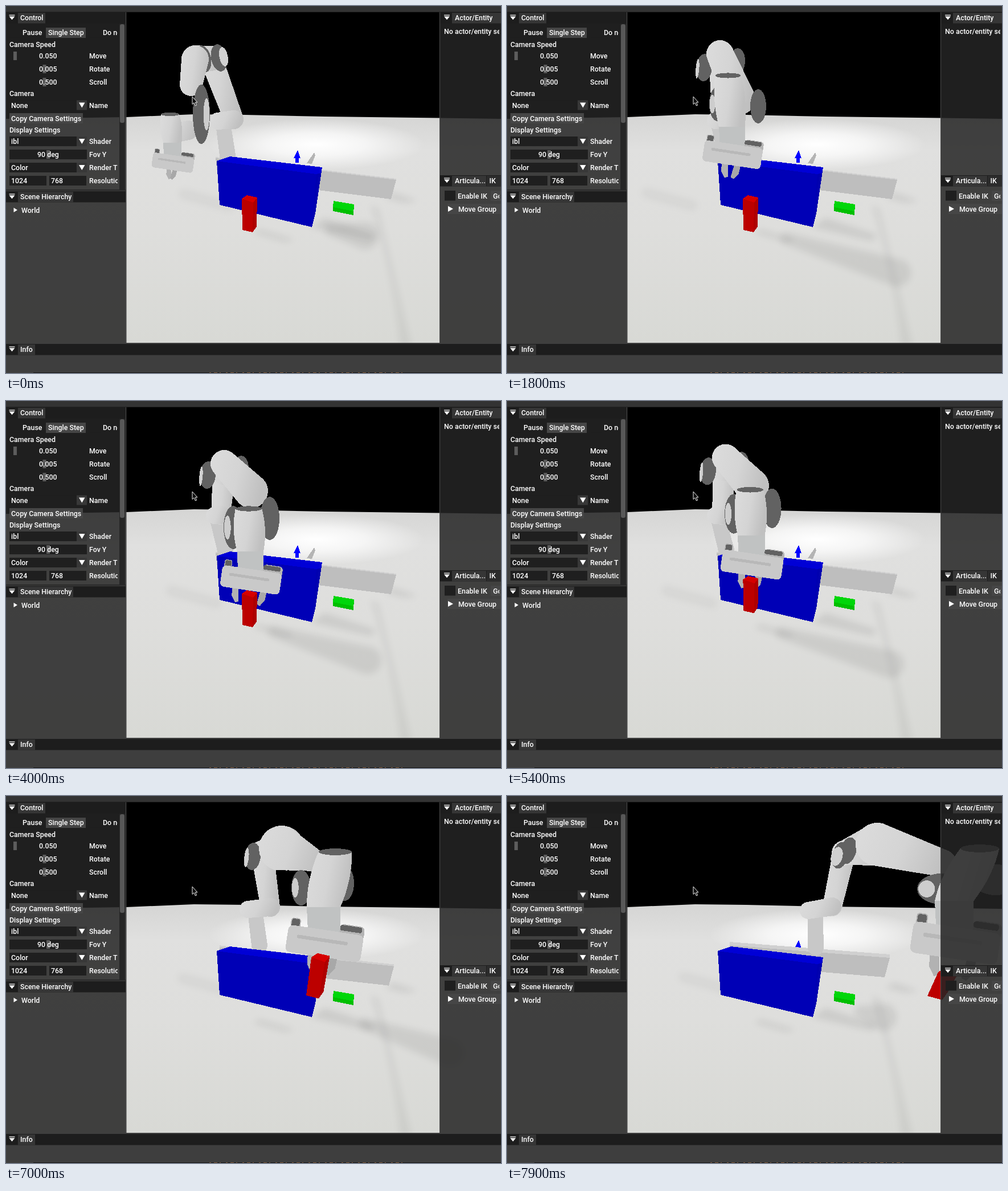
These frames come from a looping animation (869x644 px, 8 s). An HTML page:

```html
<!DOCTYPE html>
<html lang="en">
<head>
<meta charset="utf-8">
<title>Robot arm simulation</title>
<style>
html, body { margin: 0; width: 100%; height: 100%; overflow: hidden; background: #000; }
svg { display: block; }
text { font: 500 12.4px Roboto, sans-serif; fill: #fff; white-space: pre; }
</style>
</head>
<body>
<svg id="stage" width="869" height="644" viewBox="0 0 869 644">
  <defs>
    <linearGradient id="floor" x2="0" y2="1">
      <stop offset="0" stop-color="#d5d5d4"/><stop offset=".16" stop-color="#e0e0df"/>
      <stop offset=".5" stop-color="#dededc"/><stop offset="1" stop-color="#d8d9d5"/>
    </linearGradient>
    <radialGradient id="glow">
      <stop offset="0" stop-color="#fff"/><stop offset=".45" stop-color="#fff" stop-opacity=".7"/>
      <stop offset="1" stop-color="#fff" stop-opacity="0"/>
    </radialGradient>
    <linearGradient id="arm" x2="1" y2=".25">
      <stop offset="0" stop-color="#dcdcdc"/><stop offset=".55" stop-color="#d4d4d4"/>
      <stop offset="1" stop-color="#c0c0c0"/>
    </linearGradient>
    <filter id="soft" x="-30%" y="-30%" width="160%" height="160%"><feGaussianBlur stdDeviation="6"/></filter>
    <clipPath id="leftClip"><path d="M0 0H196V644H0z"/></clipPath>
    <clipPath id="rightClip"><path d="M762 0H866V644H762z"/></clipPath>
  </defs>

  <path d="M0 0H869V644H0z"/>
  <path d="M0 198L211 195 330 190 420 191 560 194 762 196.5 869 198V592H0z" fill="url(#floor)"/>
  <ellipse cx="545" cy="243" rx="190" ry="45" fill="url(#glow)"/>
  <g filter="url(#soft)">
    <path d="M640 350L654 355 712 598H692Q680 470 640 350z" opacity=".05"/>
    <path d="M535 388L560 372 650 402 640 412z" opacity=".08"/>
    <path d="M434 398L446 392 506 410 490 414z" opacity=".07"/>
    <path d="M665 336L680 328 722 342 700 345z" opacity=".08"/>
  </g>
  <g id="shadows" filter="url(#soft)"></g>
  <g shape-rendering="crispEdges">
    <path id="stub" d="M528 276L541 257 543 262 537 277z" fill="#b4b4b4"/>
    <path d="M512 253L517 267H514V275H508V267H505z" fill="#00f"/>
    <g id="back"></g>
    <path d="M370 272L546 294 537 388 375 349z" fill="#0000b6"/>
    <path d="M545 294L555 283 543 364 537 388z" fill="#0000b0"/>
    <path d="M370 272L393 264 555 283 553 293 545 295z" fill="#0000d6"/>
    <path d="M575 342L611 348 610 367 574 360z" fill="#00bf00"/>
    <path d="M575 342L611 348 610 360 574 353z" fill="#00d60a"/>
    <g id="robot"></g>
    <g id="hand"></g>
    <g id="block"></g>
  </g>
  <g id="ui"></g>
</svg>
<script>
const $ = id => document.getElementById(id);

function add(parent, tag, attrs, text) {
  const el = document.createElementNS('http://www.w3.org/2000/svg', tag);
  for (const k in attrs) el.setAttribute(k, attrs[k]);
  if (text) el.textContent = text;
  return parent.appendChild(el);
}

// Interpolates numbers, and arrays or objects of numbers.
function mix(a, b, u) {
  if (typeof a === 'number') return a + (b - a) * u;
  if (Array.isArray(a)) return a.map((v, i) => mix(v, b[i], u));
  return Object.fromEntries(Object.keys(a).map(k => [k, mix(a[k], b[k], u)]));
}
const plus = ([x, y], [dx, dy], k = 1) => [x + dx * k, y + dy * k];
const poly = (...pts) => 'M' + pts.join(' ') + 'Z';

// Limb with round ends.
function limb(a, r, b, q) {
  const len = Math.hypot(b[0] - a[0], b[1] - a[1]) || 1;
  const n = [(a[1] - b[1]) / len, (b[0] - a[0]) / len];
  return `M${plus(a, n, r)}A${r} ${r} 0 0 1 ${plus(a, n, -r)}L${plus(b, n, -q)}A${q} ${q} 0 0 1 ${plus(b, n, q)}Z`;
}
function ellipse([x, y], rx, ry, deg = 0) {
  const c = rx * Math.cos(deg * Math.PI / 180), s = rx * Math.sin(deg * Math.PI / 180);
  const arc = `A${rx} ${ry} ${deg} 0 1`;
  return `M${x - c} ${y - s}${arc} ${x + c} ${y + s}${arc} ${x - c} ${y - s}Z`;
}

// Joints of the arm; elbow and fore carry a radius, size is the half width of
// the wrist column, face tells how far the left (+) or right (-) side shows.
const home = {
  lobe: [372, 202], shoulder: [400, 199], foot: [389, 262],
  knee: [360, 92], axle: [14, -1], elbow: [332, 93, 24], fore: [325, 138, 20], face: -7.5,
  wrist: [320, 218], side: [23, -28], pad: [15, 52],
  top: [288, 190], hand: [293, 275], size: 17, open: .2, yaw: 0,
  block: [414, 338], edge: [1, 1, 55],
  shade: [570, 393, 630, 403], dim: [352, 340]
};
const swing = { ...home,
  lobe: [366, 201], shoulder: [377, 200], foot: [385, 262],
  knee: [375, 103], axle: [29, -5], elbow: [374, 84, 24], fore: [408, 163, 28], face: 3,
  wrist: [405, 174], side: [36, 2], pad: [14, 30],
  top: [388, 122], hand: [396, 261], size: 24, open: .35,
  shade: [490, 408, 685, 468], dim: [285, 338]
};
const above = { ...swing,
  knee: [380, 108], elbow: [385, 84, 24], fore: [430, 135, 30],
  wrist: [433, 162], side: [36, 0], pad: [15, 30],
  top: [428, 106], hand: [430, 247], size: 26, open: .4,
  shade: [500, 410, 730, 472], dim: [305, 343]
};
const reach = { ...above,
  knee: [383, 125], elbow: [383, 110, 24], fore: [430, 158, 30],
  wrist: [431, 214], side: [32, -8], pad: [17, 38],
  top: [426, 189], hand: [430, 314], size: 24.5, open: .9,
  shade: [470, 405, 635, 455], dim: [330, 343]
};
const grip = { ...reach, open: .5 };
const lifted = { ...above, open: .5, block: [415, 276] };
const turn = {
  lobe: [425, 199], shoulder: [464, 195], foot: [445, 262],
  knee: [450, 100], axle: [17, -6], elbow: [484, 92, 40], fore: [548, 115, 18], face: 4,
  wrist: [556, 157], side: [38, -4], pad: [17, 31],
  top: [578, 98], hand: [559, 259], size: 31, open: .5, yaw: .3,
  block: [536, 283], edge: [1.2, -9, 67],
  shade: [630, 400, 780, 450], dim: [350, 330]
};
const away = {
  lobe: [529, 201], shoulder: [571, 194], foot: [542, 266],
  knee: [592, 100], axle: [7, -4], elbow: [650, 85, 38], fore: [765, 118, 24], face: 10,
  wrist: [810, 155], side: [48, -8], pad: [42, 27],
  top: [830, 92], hand: [787, 258], size: 36, open: .8, yaw: 1,
  block: [757, 309], edge: [1.4, -19, 42],
  shade: [620, 378, 660, 388], dim: [350, 328]
};

const easeIn = u => u * u, easeOut = u => u * (2 - u), smooth = u => u * u * (3 - 2 * u);
const steps = [
  [0, home], [700, home], [1800, swing, easeIn], [2350, above, easeOut], [3100, above],
  [4000, reach, smooth], [4250, reach], [4600, grip, smooth], [4750, grip], [6250, lifted, smooth],
  [7000, turn, easeIn], [7900, away, u => u * (1.3 - .3 * u)], [8000, away]
];

const parts = [];
const part = (group, fill, shape, extra) =>
  parts.push([add($(group), 'path', { fill, ...extra }), shape]);
const light = 'url(#arm)', dark = '#626262';

part('shadows', '#000', p => limb(p.shade.slice(0, 2), 10, p.shade.slice(2), 24), { opacity: .075 });
part('shadows', '#000', p => limb(plus(p.dim, [-40, -10]), 9, plus(p.dim, [40, 12]), 9), { opacity: .035 });

// long bar, turning a little as the robot leaves
const bar = ({ yaw }) => ({
  l: mix([368, 267], [391, 262], yaw), r: mix([685, 305], [672, 284], yaw), lip: mix(2, 6, yaw)
});
part('back', '#bebebe', p => {
  const { l, r } = bar(p);
  return poly(l, r, plus(r, [-9, 34]), plus(l, [4, 34]));
});
part('back', '#d0d0d0', p => {
  const { l, r, lip } = bar(p);
  return poly(plus(l, [0, -lip]), plus(r, [0, -lip]), r, l);
});

part('back', '#c8c8c8', p => limb(p.foot, 14, mix(p.lobe, p.shoulder, .3), 13));
part('back', light, p => limb(p.shoulder, 17, p.knee, 20));
part('back', light, p => limb(p.lobe, 15, p.shoulder, 16));

// elbow with a dark cap on either end of its axle
const xy = ([x, y]) => [x, y];
const cap = (p, k) => ellipse(plus(p.knee, p.axle, k), 14, 24, p.face * 1.5);
part('robot', light, p => limb(p.knee, 22, xy(p.elbow), p.elbow[2]));
part('robot', dark, p => cap(p, 1));
part('robot', dark, p => cap(p, -1));
part('robot', '#d0d0d0', p => {
  const s = Math.sign(p.face) || 1, r = Math.abs(p.face);
  return ellipse(plus(plus(p.knee, p.axle, -s), [-s * (14 - r * .8), s * 2]), r, 17, p.face * 1.5);
});
part('robot', light, p => limb(xy(p.elbow), p.elbow[2], xy(p.fore), p.fore[2]));

// wrist: dark pads beside the column; the left one is hidden when facing right
part('robot', light, p => limb(mix(p.top, p.hand, .4), 17, p.wrist, 17));
part('robot', dark, p => ellipse(plus(p.wrist, p.side), ...p.pad));
part('robot', dark, p => {
  const k = Math.min(1, Math.max(0, p.face / 3));
  return ellipse(plus(p.wrist, p.side, -1), p.pad[0] * k, p.pad[1] * k);
});
part('robot', '#cdcdcd', p => {
  const s = Math.sign(p.face) || 1, [rx, ry] = p.pad;
  return ellipse(plus(plus(p.wrist, p.side, -s), [-s * rx * .6, 0]), rx * .35, ry * .55);
});

const neck = p => plus(p.hand, [-.05, -2.05], p.size);
const wide = (c, s, k) => [plus(c, [-s, 0], k), plus(c, [s, 0], k)];
part('robot', '#c0c2c2', p => {
  const [a, b] = wide(neck(p), p.size, .95), [c, d] = wide(p.hand, p.size, .9);
  return poly(a, b, d, c);
});
part('robot', light, p => {
  const [a, b] = wide(p.top, p.size, .95), [c, d] = wide(neck(p), p.size, .95);
  const [l, r] = wide(mix(p.top, neck(p), .5), p.size, 1.3);
  return `M${a}L${b}Q${r} ${d}L${c}Q${l} ${a}Z`;
});
part('robot', dark, p => ellipse(p.top, p.size * .93, p.size * .19));

// hand, in units of the column's half width
const gripper = $('hand');
const round = (x, y, width, height, rx, fill) => add(gripper, 'rect', { x, y, width, height, rx, fill });
const finger = s => p => {
  const x = s * p.open;
  return poly([x - s * .1, .6], [x + s * .35, .6], [x + s * .3, 1.3], [x, 1.75], [x - s * .25, 1.65], [x - s * .2, 1.3]);
};
round(-2.05, -1.2, .55, .6, .15, '#b0b0b0');
round(-2, -1.15, .45, .45, .12, dark);
round(.75, -1.25, 1.4, .8, .25, '#b4b4b4');
round(.75, -1.2, 1.25, .32, .12, dark);
part('hand', '#b2b2b2', finger(-1));
part('hand', '#a8a8a8', finger(1));
round(-2.15, -.77, 4.3, 1.54, .28, '#c9c9c9');
round(-1.6, -.28, 2.9, .2, .08, '#b8b8b8');

// red block: one top corner, then scale and the vector to its foot
const corners = ({ block: a, edge: [k, dx, dy] }) => {
  const b = plus(a, [9, -6], k), c = plus(a, [27, -2], k), d = plus(a, [20, 7], k);
  const down = pt => plus(pt, [dx, dy]);
  return { a, b, c, d, da: down(a), dc: plus(down(c), [-2, -4]), dd: plus(down(d), [-2, -3]) };
};
const face = names => p => poly(...names.map(n => corners(p)[n]));
part('block', '#ae0000', face(['d', 'c', 'dc', 'dd']));
part('block', '#bc0000', face(['a', 'd', 'dd', 'da']));
part('block', '#d60000', face(['a', 'b', 'c', 'd']));

function draw(t) {
  const i = steps.findIndex(s => s[0] > t);
  const [t0, from] = steps[i - 1], [t1, to, ease = smooth] = steps[i];
  const p = mix(from, to, ease((t - t0) / (t1 - t0)));
  for (const [el, shape] of parts) el.setAttribute('d', shape(p));
  gripper.setAttribute('transform', `translate(${p.hand}) rotate(8.5) scale(${p.size})`);
  $('stub').setAttribute('opacity', p.yaw > .3 ? 0 : 1);
}

// interface
const ui = $('ui');
const box = (x, y, width, height, fill) => add(ui, 'rect', { x, y, width, height, fill });
const path = (d, fill = '#fff') => add(ui, 'path', { d, fill });
const label = (s, x, y, clip) => add(ui, 'text', clip ? { x, y, 'clip-path': `url(#${clip})` } : { x, y }, s);
const field = '#1f1f1f', grab = '#5c5c5c', button = '#464646', panel = 'rgba(37,37,37,.855)';

path('M327 159V172.5L330 169.8 332.4 175 334.6 174 332.3 169H336z', '#111').setAttribute('stroke', '#eee');
box(0, 11, 211.5, 581, panel);
box(761.5, 11, 108, 581, panel);
box(0, 0, 869, 11, '#333');
box(0, 10, 869, 1, '#222');
box(0, 591, 869, 53, '#3e3e3e');
box(210, 11, 1, 580, '#4a4a4a');
box(761, 11, 1, 580, '#4a4a4a');
box(0, 322, 210, 2, '#292929');
box(48, 643, 821, 1, '#141414');
add(ui, 'path', { d: 'M357 643.5H700', stroke: '#a0683c', 'stroke-dasharray': '3 5 6 4 2 9', opacity: .7 });

function title(x, y, w, tab, s) {
  box(x, y, w, 19.5, '#1d1d1d');
  box(x + 21, y + 1, tab, 18.5, '#363636');
  const cx = x + (x ? 12 : 10.5);
  path(`M${cx - 5} ${y + 4.5}h10v1.2h-10zM${cx - 5} ${y + 7.2}h10l-5 6z`);
  label(s, x + (x ? 26 : 25), y + 14);
}
title(0, 11, 210, 48, 'Control');
title(0, 325, 210, 97, 'Scene Hierarchy');
title(0, 593, 869, 30, 'Info');
title(762, 11, 107, 96, 'Actor/Entity');
title(762, 297, 107, 60, 'Articula...');
box(844, 298, 25, 18.5, '#2c2c2c');
label('IK', 848.5, 311);

box(199, 31, 10, 291, '#262626');
add(ui, 'rect', { x: 200, y: 32, width: 8, height: 173, rx: 3, fill: '#585858' });
for (const [x, y] of [[6, 38], [147, 38], [770, 324]]) box(x, y, 19, 17.5, field);
for (const [x, y, w] of [[70, 38, 70], [6, 188, 129], [851, 324, 18], [775, 347, 94]]) box(x, y, w, 18, button);

function slider(y, knob, value, x, name) {
  box(6, y, 136, 17, field);
  box(knob, y + 1, 6, 15, grab);
  label(value, x, y + 13);
  label(name, 146, y + 13);
}
function combo(y, value, name) {
  box(6, y, 118, 17, field);
  box(124, y, 18, 17, '#383838');
  path(`M128 ${y + 4}h10.5l-5.2 9z`);
  label(value, 9, y + 13);
  label(name, 146, y + 13, 'leftClip');
}
slider(79, 13, '0.050', 58, 'Move');
slider(102, 64.5, '0.005', 58, 'Rotate');
slider(125, 64.5, '0.500', 58, 'Scroll');
combo(165.5, 'None', 'Name');
combo(229, 'ibl', 'Shader');
slider(252, 71, '90 deg', 55, 'Fov Y');
combo(275, 'Color', 'Render T');
for (const [x, s] of [[6, '1024'], [76, '768']]) {
  box(x, 298, 65, 17, field);
  label(s, x + 3, 311);
}
path('M13.5 354V362L20 358z');
path('M776 351V361L785 356z');

for (const [s, x, y, clip] of [
  ['Pause', 29, 51], ['Single Step', 74, 51], ['Do no', 170, 51, 'leftClip'],
  ['Camera Speed', 6, 71.5], ['Camera', 6, 158], ['Copy Camera Settings', 9, 201.5],
  ['Display Settings', 6, 222], ['Resolutio', 146, 311, 'leftClip'], ['World', 27, 363],
  ['No actor/entity sel', 769, 48.5, 'rightClip'], ['Enable IK', 793, 337.5],
  ['Go', 855, 337.5, 'rightClip'], ['Move Group', 794, 360.5]
]) label(s, x, y, clip);

function tick() {
  draw(Math.floor(performance.now() % 8000 / 100) * 100);
  requestAnimationFrame(tick);
}
tick();
</script>
</body>
</html>
```
